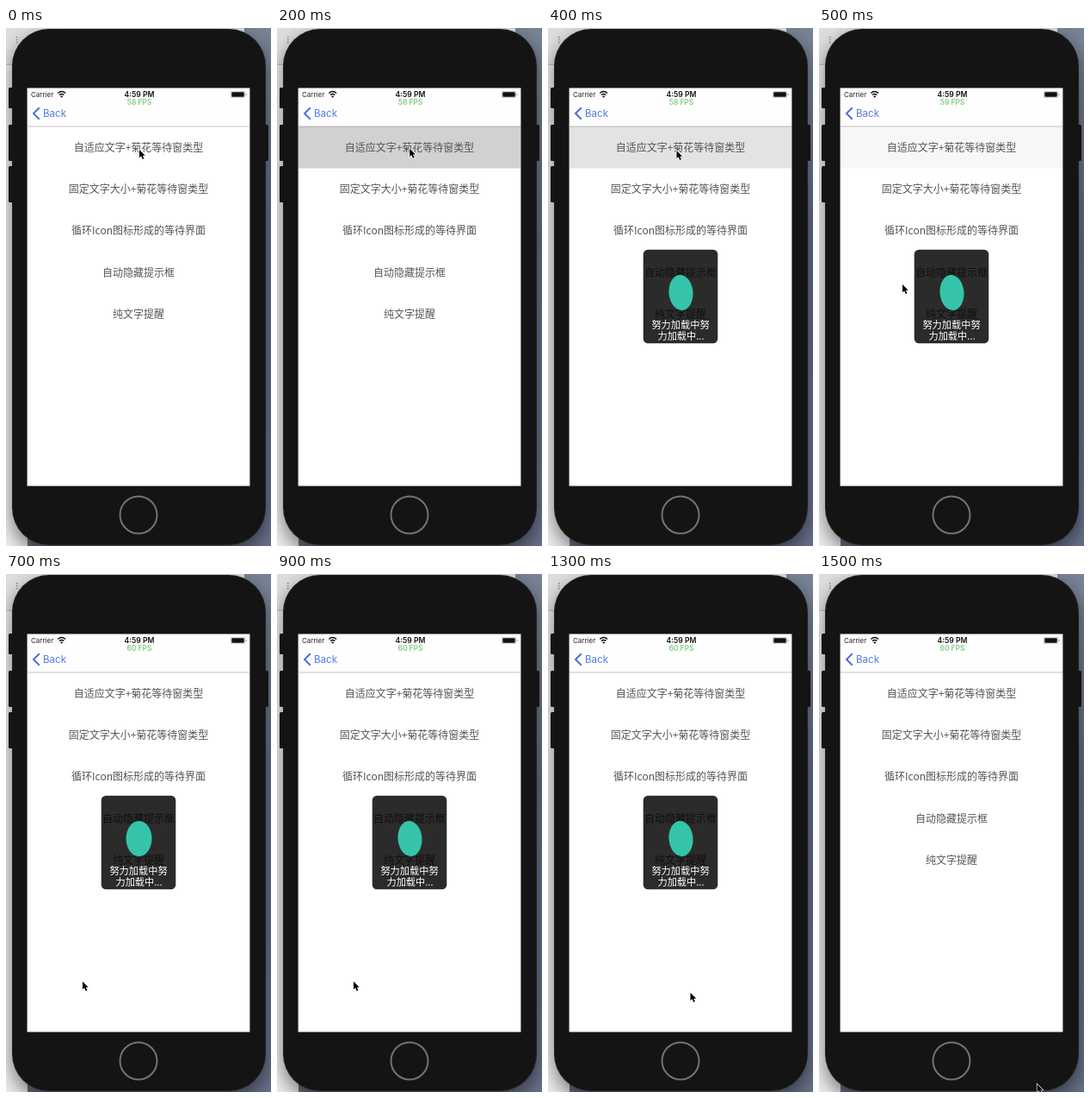
These frames come from a looping animation (308 by 600 pixels, 1.6 s). An HTML page with a canvas:

```html
<!DOCTYPE html>
<html lang="zh-CN">
<head>
<meta charset="utf-8">
<style>
  html, body { margin: 0; width: 308px; height: 600px; overflow: hidden; }
  canvas { display: block; }
</style>
</head>
<body>
<canvas id="stage" width="308" height="600"></canvas>
<script>
const ctx = document.getElementById('stage').getContext('2d');
const LATIN = 'Inter, "Liberation Sans", sans-serif';
const CJK = '"Noto Sans CJK SC", "Noto Sans CJK", sans-serif';
const STEP = 100, STEPS = 16;

const rows = ['自适应文字+菊花等待窗类型', '固定文字大小+菊花等待窗类型',
  '循环Icon图标形成的等待界面', '自动隐藏提示框', '纯文字提醒'];

// Pointer keys: step, x, y
const pointerKeys = [[0, 155, 141], [1, 155, 141], [3, 153.5, 138.5], [4, 149.5, 142],
  [6, 44.5, 452], [7, 89, 472], [12, 89, 472], [13, 165.5, 485], [15, 253.5, 591]];

function rect(x, y, w, h, color, radius = 0) {
  ctx.fillStyle = color;
  ctx.beginPath();
  ctx.roundRect(x, y, w, h, radius);
  ctx.fill();
}

function label(str, x, y, font, color, align = 'center') {
  ctx.font = font;
  ctx.fillStyle = color;
  ctx.textAlign = align;
  ctx.fillText(str, x, y);
}

function stroke(path, color, width) {
  ctx.strokeStyle = color;
  ctx.lineWidth = width;
  ctx.stroke(new Path2D(path));
}

function pointerAt(step) {
  const next = pointerKeys.findIndex(key => key[0] >= step);
  const [s1, x1, y1] = pointerKeys[next];
  const [s0, x0, y0] = pointerKeys[Math.max(0, next - 1)];
  const k = s1 > s0 ? (step - s0) / (s1 - s0) : 1;
  return [x0 + (x1 - x0) * k, y0 + (y1 - y0) * k];
}

function drawPhone() {
  const slate = ctx.createLinearGradient(0, 0, 0, 600);
  slate.addColorStop(0, '#788396');
  slate.addColorStop(.4, '#626b84');
  slate.addColorStop(1, '#68718a');
  rect(0, 0, 308, 600, slate);
  rect(0, 0, 25, 600, '#eeeeee');
  rect(0, 0, 277, 42, '#dedede');
  rect(0, 42, 28, 1, '#bdbdbd');
  for (const y of [10, 13, 16]) rect(12, y, 1.5, 1.5, '#888');

  ctx.save();
  ctx.shadowColor = 'rgba(0,0,0,.5)';
  ctx.shadowBlur = 22;
  ctx.shadowOffsetY = 9;
  rect(7, 1, 295, 598, '#202020', 43);
  ctx.restore();

  for (const [x, y, h] of [[3, 69, 24], [3, 112, 42], [3, 160, 42], [299, 112, 42]])
    rect(x, y, 6, h, '#141414', 1.5);
  rect(8, 2, 293, 596, '#141414', 42);
  stroke('M132.5 564a21.5 21.5 0 1 0 43 0a21.5 21.5 0 1 0 -43 0', '#737373', 2);
}

function drawStatus(step) {
  rect(24.6, 69.6, 258.8, 460.8, '#fff');
  rect(25, 70, 258, 44, '#fefefe');
  rect(25, 113.5, 258, 1, '#c6c6c6');

  label('Carrier', 29, 80, `8px ${LATIN}`, '#222', 'left');
  label('4:59 PM', 155, 80, `600 8.6px ${LATIN}`, '#111');
  const fps = step < 5 ? 58 : step < 7 ? 59 : 60;
  label(`${fps} FPS`, 155, 88.7, `bold 8.4px ${LATIN}`, '#8fd092');

  stroke('M60.3 75.6Q64.7 71.6 69.1 75.6M62 77.6Q64.7 75.2 67.4 77.6', '#111', 1.4);
  ctx.fillStyle = '#111';
  ctx.fill(new Path2D('M63 79L64.7 80.7L66.4 79Q64.7 77.8 63 79'));
  rect(261, 73, 17, 8, '#aaa', 2);
  rect(261.6, 73.6, 15.8, 6.8, '#fff', 1.6);
  rect(262.3, 74.3, 14.4, 5.4, '#111', 1);
  rect(278.4, 75.7, 1, 2.6, '#999', .5);

  stroke('M38.8 92.3L32 99L38.8 105.7', '#4a70e2', 2);
  label('Back', 43, 103.3, `11.6px ${LATIN}`, '#5578e2', 'left');
}

// The pressed row is shaded, then eases back to white.
function rowShade(step) {
  if (step < 1) return 0;
  const k = Math.min(1, Math.max(0, (step - 2.57) / 3.33));
  return .18 * (1 + Math.cos(Math.PI * k)) / 2;
}

function drawRows(step) {
  rect(25, 114, 258, 48.5, `rgba(0,0,0,${rowShade(step)})`);
  rows.forEach((row, i) =>
    label(row, 154, 142.8 + i * 48.3, `300 12px ${CJK}`, '#555'));
}

function drawLoader(step) {
  if (step < 3 || step > 14) return;
  rect(110.7, 256.7, 86.6, 108.6, 'rgba(0,0,0,.83)', 5.5);
  const tilted = Math.floor(step / 2) % 2 === 0;
  ctx.fillStyle = '#35c4aa';
  ctx.beginPath();
  ctx.ellipse(154.5, 306.5, tilted ? 14 : 15, 20.5, tilted ? -.08 : 0, 0, 2 * Math.PI);
  ctx.fill();
  label('努力加载中努', 154, 348, `11.2px ${CJK}`, '#fff');
  label('力加载中...', 154.5, 361.2, `11.2px ${CJK}`, '#fff');
}

function drawPointer(step) {
  ctx.save();
  ctx.translate(...pointerAt(step));
  const arrow = new Path2D('M0 0V9.2L2.1 7.3L3.7 11L5.4 10.3L3.8 6.7H6.7Z');
  ctx.strokeStyle = '#fff';
  ctx.lineWidth = 1.3;
  ctx.stroke(arrow);
  ctx.fillStyle = '#000';
  ctx.fill(arrow);
  ctx.restore();
}

function frame(now) {
  const step = Math.floor(now / STEP) % STEPS;
  drawPhone();
  drawStatus(step);
  drawRows(step);
  drawLoader(step);
  drawPointer(step);
  requestAnimationFrame(frame);
}
frame(0);
</script>
</body>
</html>
```
